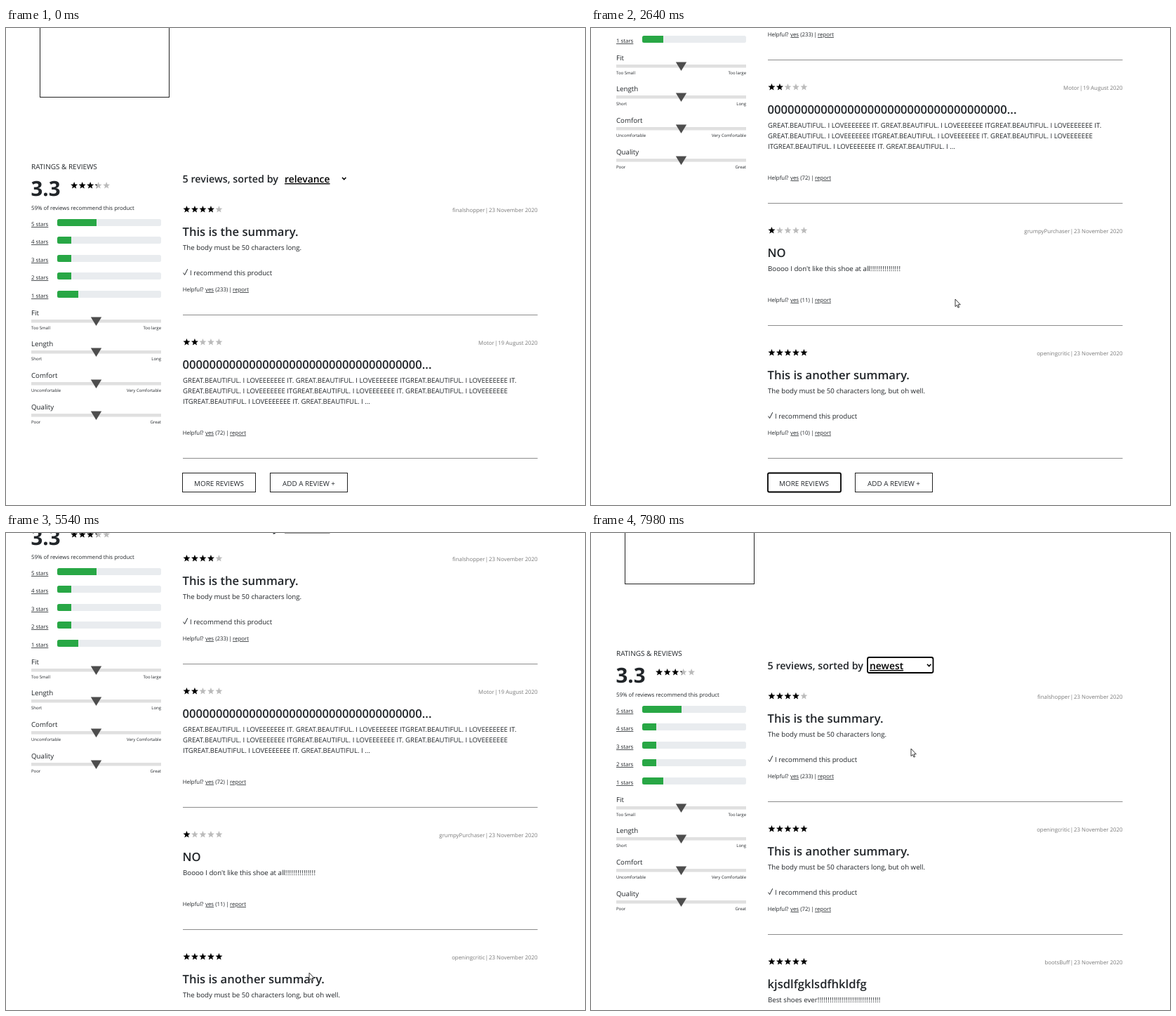
An HTML page for the animation above (8 s loop, 825 by 679 pixels).

```html
<!DOCTYPE html>
<html lang="en">
<head>
<meta charset="utf-8">
<title>Ratings and reviews</title>
<style>
  html, body { margin: 0; width: 100%; height: 100%; overflow: hidden; background: #fff; }
  svg { display: block; }
  text { font-family: "Open Sans", "Noto Sans", sans-serif; fill: #212529; text-rendering: geometricPrecision; }
  .u { text-decoration: underline; }
  .semi { font-weight: 600; }
  .muted { fill: #7a7a7a; }
</style>
</head>
<body>
<svg id="stage" width="825" height="679" viewBox="0 0 825 679">
  <g id="page">
    <g id="side"></g>
    <g id="sort"></g>
    <g id="list"></g>
    <g id="buttons"></g>
    <g id="popup"></g>
  </g>
  <circle id="click" r="8" fill="#fff02a" opacity=".78"/>
  <path id="cursor" fill="#fff" stroke="#222" stroke-width=".9" stroke-linejoin="round"/>
</svg>
<script>
const LOOP = 8000, TITLE = 16.63, BODY = 9.7, SMALL = 7.85, TINY = 6;
const $ = id => document.getElementById(id);

const text = (x, y, size, s, attrs = "") =>
  `<text x="${x}" y="${y}" font-size="${size}" ${attrs}>${s}</text>`;
const rect = (x, y, w, h, attrs) =>
  `<rect x="${x}" y="${y}" width="${w}" height="${h}" ${attrs}/>`;
const END = 'text-anchor="end"', MID = 'text-anchor="middle"';
const bangs = n => `<tspan letter-spacing=".31">${"!".repeat(n)}</tspan>`;

// Five stars, the black ones clipped to the rating
const PITCH = 11.5;
function stars(x, y, rating) {
  const row = fill => [0, 1, 2, 3, 4].map(i => {
    const pts = Array.from({ length: 10 }, (_, k) => {
      const r = k % 2 ? 2.2 : 5.2, a = k * Math.PI / 5;
      return (PITCH * (i + .5) + r * Math.sin(a)).toFixed(2) + "," + (6.3 - r * Math.cos(a)).toFixed(2);
    });
    return `<polygon points="${pts.join(" ")}" fill="${fill}"/>`;
  }).join("");
  const clip = (n, fill) =>
    `<svg x="${x}" y="${y - 6}" width="${PITCH * n}" height="13">${row(fill)}</svg>`;
  return clip(5, "#bbb") + clip(rating, "#000");
}

function sidePanel() {
  let s = rect(48.5, -300, 184, 398.5, 'fill="none" stroke="#222"');
  s += text(36, 201, 10, "RATINGS &amp; REVIEWS", 'font-weight="500"');
  s += text(35.5, 239, 29.4, "3.3", 'font-weight="700"');
  s += stars(91.4, 224, 3.3);
  s += text(36, 259, SMALL, "59% of reviews recommend this product");
  [56, 20, 20, 20, 30].forEach((w, i) => {
    const y = 272 + Math.floor(25.5 * i);
    s += text(36, y + 10, SMALL, `${5 - i} stars`, 'class="u"');
    s += rect(73, y, 148, 10, 'rx="2.5" fill="#e9ecef"');
    s += `<path d="M${73 + w} ${y}H75.5a2.5 2.5 0 0 0-2.5 2.5v5a2.5 2.5 0 0 0 2.5 2.5H${73 + w}z" fill="#28a745"/>`;
  });
  [["Fit", "Too Small", "Too large"], ["Length", "Short", "Long"],
   ["Comfort", "Uncomfortable", "Very Comfortable"], ["Quality", "Poor", "Great"]]
    .forEach(([name, low, high], i) => {
      const y = 409 + Math.floor(44.7 * i);
      s += text(36, y, BODY, name);
      s += rect(36, y + 6, 185, 4.5, 'fill="#e0e0e0"');
      s += `<path d="M120.8 ${y + 2.5}h15.4l-7.7 12.5z" fill="#4d4d4d"/>`;
      s += text(36, y + 20, TINY, low) + text(221, y + 20, TINY, high, END);
    });
  return s;
}

const love = "GREAT.BEAUTIFUL. I LOVEEEEEEE";
const NOV = "23 November 2020";
const summary = { stars: 4, user: "finalshopper", date: NOV, title: "This is the summary.",
  body: ["The body must be 50 characters long."], rec: true };
const zeros = { stars: 2, user: "Motor", date: "19 August 2020", title: "0".repeat(36) + "...",
  body: [`${love} IT. ${love} IT${love} IT.`, `${love} IT${love} IT. ${love}`,
    `IT${love} IT. GREAT.BEAUTIFUL. I ...`] };
const no = { stars: 1, user: "grumpyPurchaser", date: NOV, title: "NO",
  body: ["Boooo I don't like this shoe at all" + bangs(15)] };
const another = { stars: 5, user: "openingcritic", date: NOV, title: "This is another summary.",
  body: ["The body must be 50 characters long, but oh well."], rec: true };
const best = { stars: 5, user: "bootsBuff", date: NOV, title: "kjsdlfgklsdfhkldfg",
  body: ["Best shoes ever" + bangs(31)], rec: true };

const VIEWS = [
  [summary, zeros],
  [summary, zeros, no, another],
  [summary, zeros, no, another, best],
  [summary, another, best, zeros, no]
];
const HELPFUL = [233, 72, 11, 10, 9];

function reviewList(view) {
  let y = 258, s = "";
  VIEWS[view].forEach((r, i) => {
    const dateX = 757.5 - (r.date === NOV ? 69.6 : 56.4);
    s += stars(251.7, y, r.stars);
    s += text(757.5, y + 4, SMALL, r.date, END + ' class="muted"');
    s += text(dateX - 3, y + 4, SMALL, "|", MID + ' class="muted"');
    s += text(dateX - 5.5, y + 4, SMALL, r.user, END + ' class="muted"');
    s += text(251.5, y + 38, TITLE, r.title, 'class="semi"');
    r.body.forEach((line, k) => s += text(252, y + 57.5 + 15.4 * k, r === zeros ? 9.61 : BODY, line));
    if (r.rec) {
      s += `<path d="M252.6 ${y + 90.5}l2 3 4.2-8.4" fill="none" stroke="#212529"/>`;
      s += text(262, y + 93.5, BODY, "I recommend this product");
    }
    const h = y + (r.rec ? 114 : 84 + 15 * r.body.length), reportX = HELPFUL[i] > 99 ? 323 : 319;
    s += text(251.7, h + 3, SMALL, "Helpful?") + text(284, h + 3, SMALL, "yes", 'class="u"');
    s += text(298.3, h + 3, SMALL, `(${HELPFUL[i]})`);
    s += text(reportX - 3.5, h + 3, SMALL, "|", MID) + text(reportX, h + 3, SMALL, "report", 'class="u"');
    s += `<path d="M252 ${h + 36.5}H757.5" stroke="#8c8c8c"/>`;
    y = h + 75;
  });
  return { html: s, buttonY: y - 17.5 };
}
const lists = VIEWS.map((_, i) => reviewList(i));

function sortLine(label, focus) {
  return text(251.5, 220, 14.35, "5 reviews, sorted by", 'class="semi"')
    + text(397, 220, 13.9, label, 'class="semi u" style="fill:#000"')
    + '<path d="M479 212.8l2.7 2.7 2.7-2.7" fill="none" stroke="#000" stroke-width="1.6"/>'
    + (focus ? rect(394, 203, 93.5, 22, 'rx="2.5" fill="none" stroke="#000" stroke-width="1.8"') : "");
}

const BUTTONS = [["MORE REVIEWS", 251.5, 104], ["ADD A REVIEW +", 376.5, 110]];
function buttons(y, hover, focused) {
  return BUTTONS.map(([label, x, w], i) => {
    const on = focused && i === 0, dim = hover === i ? 'opacity=".55"' : "";
    const frame = on ? 'rx="2" stroke="#000" stroke-width="1.8"' : 'stroke="#222" ' + dim;
    return rect(x + (on ? .5 : 0), y, w, 27, `fill="none" ${frame}`)
      + text(x + w / 2, y + 18, 9.85, label, MID + " " + dim);
  }).join("");
}

function popup(row) {
  return rect(393.5, 226.5, 95, 63, 'fill="#fff" stroke="#767676"')
    + ["relevance", "helpful", "newest"].map((label, i) => {
      const y = 227 + i * 20.6, on = i === row;
      return (on ? rect(394, y, 94, 20.6, 'fill="#1967d2"') : "")
        + text(397, y + 15, 13.9, label, `class="semi" ${on ? 'style="fill:#fff"' : ""}`);
    }).join("");
}

// Segments: start, end, step count, target; the first step lands at the start time
function track(t, value, segments) {
  for (const [t0, t1, n, to] of segments) {
    if (t < t0) break;
    const k = Math.min(n, Math.floor((t - t0) * (n - 1) / (t1 - t0) + .01) + 1);
    value += (to - value) * k / n;
  }
  return value;
}
const SCROLL = [[2170, 2640, 7, 363], [4034, 4035, 2, 425], [4112, 4190, 2, 552],
  [4910, 5310, 6, 247], [5540, 6340, 11, -23], [7900, 7980, 2, 26]];
const MOVES = [[220, 690, 7, 295, 643], [1860, 2020, 3, 519, 386], [3030, 3420, 6, 310, 637],
  [3800, 3956, 3, 349, 544], [4350, 4510, 3, 430, 645], [4670, 4760, 2, 432, 626],
  [5700, 6340, 9, 450, 220], [6420, 6580, 3, 452, 240], [6810, 7050, 4, 456, 307]];
const axis = i => MOVES.map(m => [m[0], m[1], m[2], m[i]]);
const MOVE_X = axis(3), MOVE_Y = axis(4);
const CLICKS = [[1550, 1650], [3570, 3650], [6660, 6740], [7360, 7510]];
const within = (t, [a, b]) => t >= a && t < b;

const ARROW = "M0 0V10.6l2.4-2.2 1.6 3.7 1.6-.7-1.6-3.6h3.3z";
const HAND = "M-1.2 8V-.2a1.2 1.2 0 0 1 2.4 0V4q2.2-.6 2.3.8 2-.4 2.1.8 1.8-.2 1.8 1.2v3.4q0 1.6-1.2 3.4H0L-3.8 7.6q.6-1.8 2.6.4z";

const drawn = {};
function put(id, key, make) {
  if (drawn[id] === key) return;
  drawn[id] = key;
  $(id).innerHTML = make();
}

function render(t) {
  const scroll = Math.round(track(t, 0, SCROLL));
  const x = track(t, 561, MOVE_X), y = track(t, 590.5, MOVE_Y);
  const view = [1700, 3650, 7510].filter(at => t >= at).length;
  const { html, buttonY } = lists[view];
  const top = buttonY - scroll, visible = t >= 220;
  const hover = visible && y > top && y < top + 27
    ? BUTTONS.findIndex(([, bx, w]) => x > bx && x < bx + w) : -1;
  const open = within(t, [6740, 7510]);
  const row = open ? Math.max(0, Math.min(2, Math.floor((y - 250) / 20.6))) : -1;

  $("page").setAttribute("transform", `translate(0 ${-scroll})`);
  put("sort", view === 3, () => view === 3 ? sortLine("newest", true) : sortLine("relevance", false));
  put("list", view, () => html);
  put("buttons", view + "/" + hover, () => buttons(buttonY, hover, view > 0));
  put("popup", row, () => open ? popup(row) : "");

  const at = `translate(${x.toFixed(1)} ${y.toFixed(1)})`;
  $("click").setAttribute("transform", at);
  $("click").setAttribute("visibility", CLICKS.some(c => within(t, c)) ? "visible" : "hidden");
  $("cursor").setAttribute("transform", at);
  $("cursor").setAttribute("d", hover >= 0 ? HAND : ARROW);
  $("cursor").setAttribute("visibility", visible ? "visible" : "hidden");
}

$("side").innerHTML = sidePanel();
const start = performance.now();
function tick() {
  render((performance.now() - start) % LOOP);
  requestAnimationFrame(tick);
}
tick();
</script>
</body>
</html>
```
